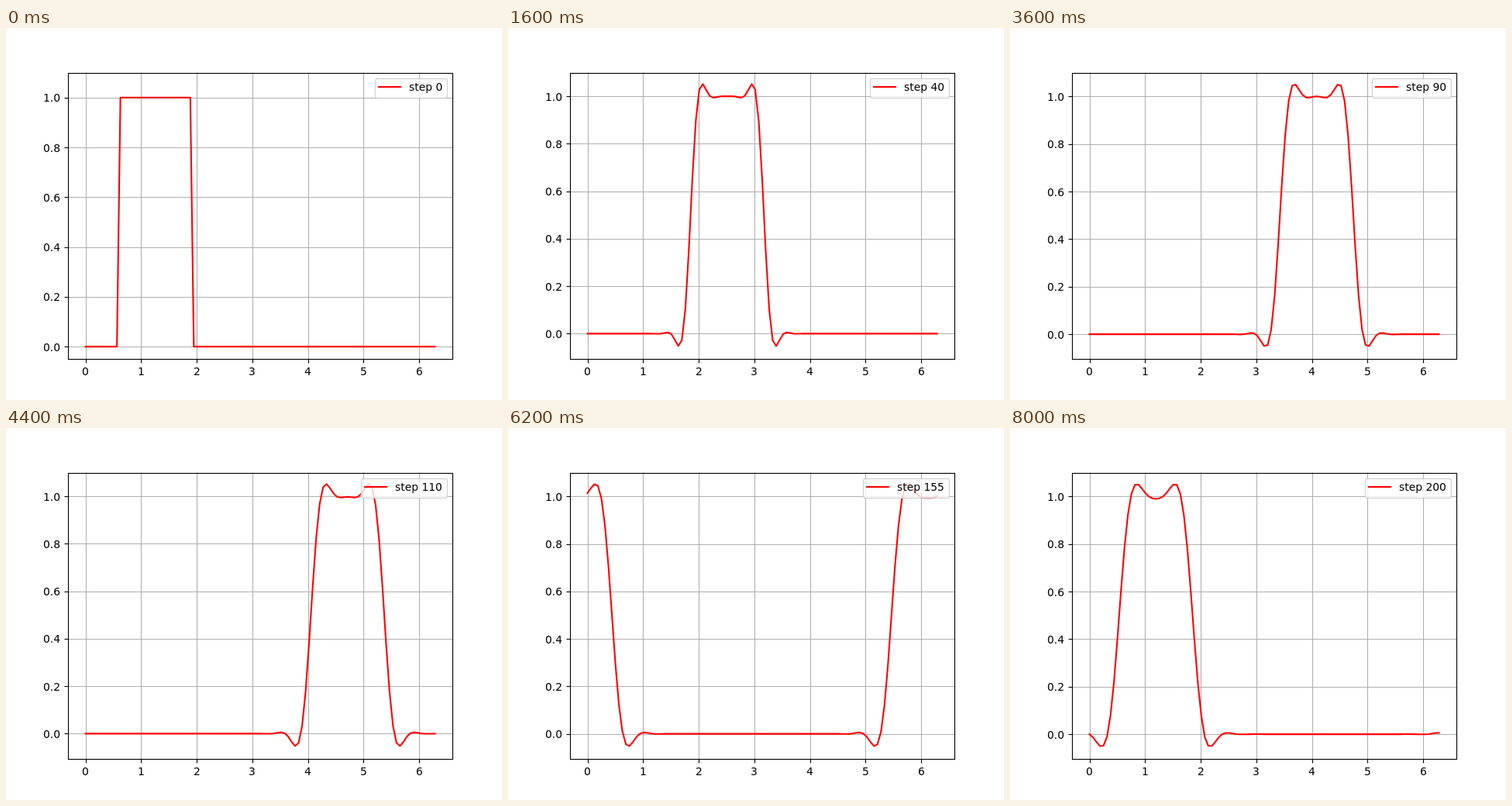
Animation, 640 px wide and 480 px high, one loop 8.2 s. Source, as an HTML page with a canvas:

```html
<!DOCTYPE html>
<html lang="en">
<head>
<meta charset="utf-8">
<title>Advected square wave</title>
<style>
html, body { margin: 0; width: 100%; height: 100%; overflow: hidden; background: #fff; }
canvas { display: block; }
</style>
</head>
<body>
<canvas id="plot" width="640" height="480"></canvas>
<script>
const ctx = document.getElementById('plot').getContext('2d');

const FRAME_MS = 200, FRAMES = 41, STEPS_PER_FRAME = 5;
const CELLS = 101, DX = 2 * Math.PI / 100;
const PT = 100 / 72, FONT = 10 * PT, HAIR = 0.8 * PT;
const DIGIT = 8.875, STEP_WORD = 34.5;
const box = { l: 80, r: 576, t: 57.6, b: 427.2 };
const innerW = (box.r - box.l) / 1.1;
const xScale = innerW / (2 * Math.PI);
const px = x => box.l + innerW * 0.05 + x * xScale;
const snap = v => Math.floor(v + 0.5) + 0.5;

// Cubic interpolation half a cell upstream, periodic
function advance(u) {
  const at = i => u[(i + CELLS) % CELLS];
  return u.map((v, i) => (9 * (v + at(i - 1)) - at(i - 2) - at(i + 1)) / 16);
}

function solve() {
  let u = Array.from({ length: CELLS }, (_, i) => (i >= 10 && i <= 30 ? 1 : 0));
  const states = [u];
  while (states.length < FRAMES) {
    for (let k = 0; k < STEPS_PER_FRAME; k++) u = advance(u);
    states.push(u);
  }
  return states;
}
const states = solve();

function line(x1, y1, x2, y2, color, width) {
  ctx.strokeStyle = color;
  ctx.lineWidth = width;
  ctx.beginPath();
  ctx.moveTo(x1, y1);
  ctx.lineTo(x2, y2);
  ctx.stroke();
}

function text(str, x, y) {
  ctx.fillStyle = '#000';
  ctx.fillText(str, Math.round(x), Math.round(y));
}

function drawAxes(py) {
  const left = snap(box.l), bottom = snap(box.b);
  for (let i = 0; i <= 6; i++) {
    const x = snap(px(i));
    line(x, box.t, x, box.b, '#b0b0b0', HAIR);
    line(x, bottom, x, bottom + 5, '#000', HAIR);
    text(String(i), px(i) - DIGIT / 2, 448);
  }
  for (let i = 0; i <= 5; i++) {
    const v = i / 5, y = snap(py(v));
    line(box.l, y, box.r, y, '#b0b0b0', HAIR);
    line(left, y, left - 5, y, '#000', HAIR);
    text(v.toFixed(1), 48, py(v) + 5.5);
  }
}

function drawCurve(u, py) {
  ctx.save();
  ctx.beginPath();
  ctx.rect(box.l, box.t, box.r - box.l, box.b - box.t);
  ctx.clip();
  ctx.strokeStyle = '#f00';
  ctx.lineWidth = 1.5 * PT;
  ctx.lineJoin = 'round';
  ctx.lineCap = 'square';
  ctx.beginPath();
  u.forEach((v, i) => ctx.lineTo(px(i * DX), py(v)));
  ctx.stroke();
  ctx.restore();
}

function drawSpines() {
  const l = snap(box.l), t = snap(box.t);
  ctx.strokeStyle = '#000';
  ctx.lineWidth = HAIR;
  ctx.strokeRect(l, t, snap(box.r) - l, snap(box.b) - t);
}

function drawLegend(step) {
  const textX = 563.5 - STEP_WORD - DIGIT * String(step).length;
  const handleX = textX - 2.8 * FONT;
  const l = snap(handleX - 0.4 * FONT);
  ctx.beginPath();
  ctx.roundRect(l, 65.5, 569.5 - l, 25, 0.2 * FONT);
  ctx.fillStyle = 'rgba(255,255,255,0.8)';
  ctx.fill();
  ctx.strokeStyle = 'rgba(204,204,204,0.8)';
  ctx.lineWidth = PT;
  ctx.stroke();
  const cap = 0.75 * PT;
  line(Math.round(handleX) - cap, 76, Math.round(handleX + 2 * FONT) + cap, 76, '#f00', 1.5 * PT);
  text('step ' + step, textX, 81);
}

function draw(frame) {
  const u = states[frame];
  const lo = Math.min(...u), hi = Math.max(...u);
  const yMin = lo - 0.05 * (hi - lo), yMax = 1.1;
  const py = v => box.t + (yMax - v) / (yMax - yMin) * (box.b - box.t);
  ctx.fillStyle = '#fff';
  ctx.fillRect(0, 0, 640, 480);
  ctx.font = FONT + 'px "DejaVu Sans", sans-serif';
  drawAxes(py);
  drawCurve(u, py);
  drawSpines();
  drawLegend(frame * STEPS_PER_FRAME);
}

function tick(now) {
  draw(Math.floor(Math.max(now, 0) / FRAME_MS) % FRAMES);
  requestAnimationFrame(tick);
}
draw(0);
requestAnimationFrame(tick);
</script>
</body>
</html>
```
